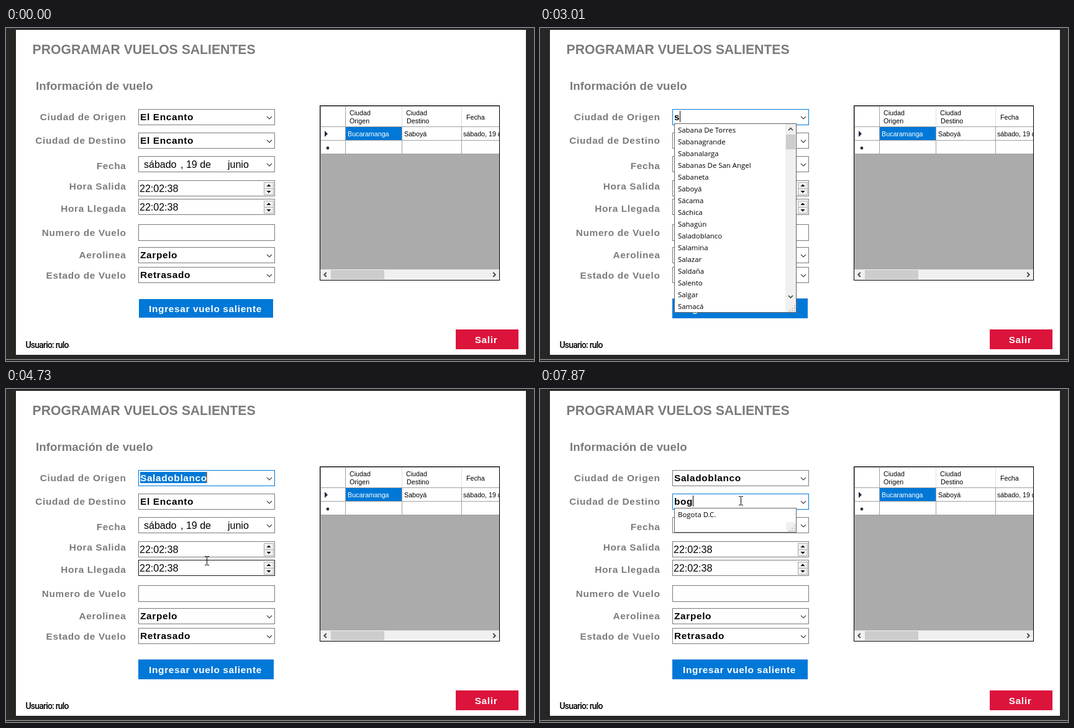
An HTML page with a canvas for the animation above (8 s loop, 850x538 px).

```html
<!DOCTYPE html>
<html lang="es">
<head>
<meta charset="utf-8">
<title>Programar vuelos salientes</title>
<style>
html, body { margin: 0; width: 100%; height: 100%; overflow: hidden; background: #262626; }
canvas { display: block; }
</style>
</head>
<body>
<canvas id="stage" width="850" height="538"></canvas>
<script>
const ctx = document.getElementById('stage').getContext('2d');
const LOOP = 8000, STEP = 200 / 3;
const BLUE = '#0078d7', GRAY = '#7a7a7a', LABEL = '#7b7b7b';
const SANS = '"Liberation Sans", Arial, sans-serif';
const BOLD = `bold 15.4px ${SANS}`, PLAIN = `16px ${SANS}`, SMALL = `10.7px ${SANS}`;
const BOLD_SPACING = 0.65;
const MENU = '11.4px "Open Sans", sans-serif';

const LABELS = [
  ['Ciudad de Origen', 149], ['Ciudad de Destino', 187], ['Fecha', 228],
  ['Hora Salida', 261], ['Hora Llegada', 297], ['Numero de Vuelo', 336],
  ['Aerolinea', 372], ['Estado de Vuelo', 405]
];
const FIELDS = [
  { y: 131, kind: 'combo' }, { y: 169, kind: 'combo' }, { y: 207, kind: 'date' },
  { y: 246, kind: 'time' }, { y: 276, kind: 'time' }, { y: 317, kind: 'text', h: 27 },
  { y: 354, kind: 'combo', text: 'Zarpelo' }, { y: 386, kind: 'combo', text: 'Retrasado' }
];
const ALL = ('El Encanto,La Chorrera,La Pedrera,La Victoria,Leticia,Mirití - Paraná,Puerto Alegría,' +
  'Puerto Arica,Puerto Nariño,Puerto Santander,Tarapacá,Abejorral,Abriaquí,Alejandría,Amagá,' +
  'Amalfi,Andes,Angelópolis,Angostura,Anorí').split(',');
const S_LIST = ('Sabana De Torres,Sabanagrande,Sabanalarga,Sabanas De San Angel,Sabaneta,Saboyá,' +
  'Sácama,Sáchica,Sahagún,Saladoblanco,Salamina,Salazar,Saldaña,Salento,Salgar,Samacá,' +
  'Samaná,Samaniego').split(',');
const SA_LIST = S_LIST.filter(name => name[1] === 'a');
const B_LIST = ('Bagadó,Bahía Solano,Bajo Baudó,Balboa,Baranoa,Baraya,Barbacoas,Barbosa,Barichara,' +
  'Barranca De Upía,Barrancabermeja,Barrancas,Barranco De Loba,Barranco Minas,Barranquilla,' +
  'Becerril').split(',');
const BO_LIST = 'Boavita,Bochalema,Bogota D.C.,Bojacá,Bojayá,Bolívar,Bosconia,Boyacá'.split(',');

// Pointer path: time, x, y
const PATH = [
  [270, 637, 449], [1070, 421, 147], [1670, 421, 147], [1800, 394, 149], [3490, 394, 149],
  [4000, 323, 313], [4130, 323, 302], [4460, 323, 302], [5060, 323, 215], [5265, 323, 180]
];
const CLICKS = [[1210, 1410], [1800, 2010], [4320, 4520], [5550, 5680]];

const between = (t, a, b) => t >= a && t < b;

function rect(x, y, w, h, color) {
  ctx.fillStyle = color;
  ctx.fillRect(x, y, w, h);
}
function box(x, y, w, h, border, fill) {
  rect(x, y, w, h, border);
  rect(x + 1, y + 1, w - 2, h - 2, fill);
}
function text(str, x, y, font, color, spacing = 0, align = 'left') {
  ctx.font = font;
  ctx.letterSpacing = spacing + 'px';
  ctx.textAlign = align;
  ctx.fillStyle = color;
  ctx.fillText(str, x, y);
}
const bold = (str, x, y, color = '#000', align) => text(str, x, y, BOLD, color, BOLD_SPACING, align);

function shape(points, color, x = 0, y = 0) {
  ctx.beginPath();
  points.forEach(([px, py]) => ctx.lineTo(x + px, y + py));
  ctx.closePath();
  ctx.fillStyle = color;
  ctx.fill();
}
function chevron(x, y, angle = 0, width = 1.2, size = 4) {
  ctx.save();
  ctx.translate(x, y);
  ctx.rotate(angle);
  ctx.beginPath();
  ctx.moveTo(-size, -size / 2);
  ctx.lineTo(0, size / 2);
  ctx.lineTo(size, -size / 2);
  ctx.strokeStyle = '#444';
  ctx.lineWidth = width;
  ctx.stroke();
  ctx.restore();
}

function pointerAt(time) {
  if (time < 270 || between(time, 3010, 3490)) return null;
  const t = 270 + Math.floor((time - 269) / STEP) * STEP;
  const next = PATH.findIndex(p => p[0] > t);
  if (next < 0) return { x: 323, y: 180 };
  const [ta, xa, ya] = PATH[Math.max(0, next - 1)], [tb, xb, yb] = PATH[next];
  const u = Math.max(0, (t - ta) / (tb - ta)), k = u * u * (3 - 2 * u);
  return { x: Math.round(xa + (xb - xa) * k), y: Math.round(ya + (yb - ya) * k) };
}

function originAt(t) {
  const blinkOff = between(t, 2410, 2870) || between(t, 3620, 4390) || t >= 4920;
  const value = t < 3010 ? 'El Encanto' : t < 3090 ? 's' : t < 4390 ? 'sa' : 'Saladoblanco';
  const focus = between(t, 1210, 5550);
  return {
    text: value, focus, caret: focus && !blinkOff,
    selected: focus && !between(t, 3010, 4390),
    list: between(t, 3010, 3090) ? S_LIST : between(t, 3090, 4390) ? SA_LIST : null
  };
}
function destinationAt(t) {
  const blinkOff = between(t, 6210, 6740) || between(t, 7270, 7530);
  const value = t < 7530 ? 'El Encanto' : t < 7750 ? 'b' : t < 7870 ? 'bo' : 'bog';
  const focus = t >= 5550;
  return {
    text: value, focus, caret: focus && !blinkOff, selected: focus && t < 7530,
    list: { b: B_LIST, bo: BO_LIST, bog: ['Bogota D.C.'] }[value] || null
  };
}

function entry(state, y) {
  ctx.font = BOLD;
  ctx.letterSpacing = BOLD_SPACING + 'px';
  const end = 216 + Math.floor(ctx.measureText(state.text).width);
  if (state.selected) rect(216, y + 3, end - 216, 18, BLUE);
  bold(state.text, 216, y + 18, state.selected ? '#fff' : '#000');
  if (state.caret) rect(end, y + 3, 1, 18, state.selected ? '#ff8728' : '#000');
}

function spinner(y) {
  for (const [top, dir] of [[y + 3, -1], [y + 13, 1]]) {
    box(415, top, 16, 11, '#acacac', '#f0f0f0');
    const mid = top + 5.5;
    shape([[419.5, mid - 1.5 * dir], [426.5, mid - 1.5 * dir], [423, mid + 2 * dir]], '#000');
  }
}

function drawField(field, state, pointer, covered) {
  const { y, kind, h = 26 } = field;
  const hover = pointer && !covered && between(pointer.x, 213, 433) && between(pointer.y, y, y + h);
  const border = state && state.focus ? BLUE : hover ? '#171717' : GRAY;
  box(213, y, 220, h, border, '#fff');
  if (kind === 'combo' && hover && pointer.x >= 416) box(416, y, 17, h, '#005499', '#cce4f7');
  if (kind === 'combo' || kind === 'date') chevron(424, y + 14);
  if (state) entry(state, y);
  else if (kind === 'combo') bold(field.text, 216, y + 18);
  else if (kind === 'date') {
    text('sábado', 222, y + 19, PLAIN, '#000');
    text(', 19 de', 281, y + 19, PLAIN, '#000');
    text('junio', 357, y + 19, PLAIN, '#000');
  } else if (kind === 'time') {
    text('22:02:38', 215, y + 19, PLAIN, '#000');
    spinner(y);
  }
  return hover && kind !== 'date' && pointer.x < 415;
}

function drawGrid() {
  box(505, 125, 290, 283, '#000', '#ababab');
  rect(506, 126, 288, 78, '#fff');
  for (const y of [126, 159, 181, 203]) rect(506, y, 288, 1, '#a0a0a0');
  for (const x of [637, 733]) {
    rect(x, 127, 1, 32, '#e0e0e0');
    rect(x, 159, 1, 45, '#a0a0a0');
  }
  for (const x of [506, 546]) rect(x, 126, 1, 78, '#a0a0a0');
  rect(547, 160, 90, 21, BLUE);
  text('Ciudad', 553, 141, SMALL, '#000');
  text('Origen', 553, 154, SMALL, '#000');
  text('Ciudad', 644, 141, SMALL, '#000');
  text('Destino', 645, 154, SMALL, '#000');
  text('Fecha', 741, 148, SMALL, '#000');
  text('Bucaramanga', 550, 175, SMALL, '#fff');
  text('Saboyá', 641, 175, SMALL, '#000');
  ctx.save();
  ctx.beginPath();
  ctx.rect(734, 160, 60, 21);
  ctx.clip();
  text('sábado, 19 de junio', 736, 175, SMALL, '#000');
  ctx.restore();
  shape([[513, 166], [518, 171], [513, 176]], '#2b2540');
  ctx.beginPath();
  ctx.arc(518, 194, 2.4, 0, 7);
  ctx.fillStyle = '#333';
  ctx.fill();
  rect(506, 390, 288, 17, '#f0f0f0');
  rect(523, 391, 86, 15, '#cdcdcd');
  chevron(514, 398.5, Math.PI / 2, 1.8, 3.5);
  chevron(786, 398.5, -Math.PI / 2, 1.8, 3.5);
}

function drawForm(t) {
  rect(0, 0, 850, 538, '#262626');
  rect(16, 3, 821, 525, '#fff');
  rect(0, 535, 850, 1, '#b4b0b0');
  text('PROGRAMAR VUELOS SALIENTES', 42.5, 42, `bold 21.2px ${SANS}`, LABEL);
  text('Información de vuelo', 48, 100, `bold 18.67px ${SANS}`, LABEL, 0.05);
  for (const [label, y] of LABELS) bold(label, 193.5, y, LABEL, 'right');
  const grow = t >= 1270 ? 1 : 0;
  rect(214 - grow, 438 - grow, 216 + 2 * grow, 30 + 2 * grow, BLUE);
  bold('Ingresar vuelo saliente', 321, 459, '#fff', 'center');
  rect(724, 487, 101, 32, '#dc143c');
  bold('Salir', 773, 509, '#fff', 'center');
  text('Usuario: rulo', 31.5, 517, '500 14px Roboto, sans-serif', '#000', -0.8);
  drawGrid();
}

function drawDropdown() {
  rect(433, 161, 5, 377, 'rgba(0,0,0,.12)');
  box(213, 157, 220, 400, '#000', '#fff');
  ALL.forEach((city, i) => {
    const y = 158 + i * 20;
    if (!i) rect(214, y, 202, 20, BLUE);
    bold(city, 216, y + 15, i ? '#000' : '#fff');
  });
  rect(416, 158, 16, 380, '#f0f0f0');
  rect(416, 175, 16, 20, '#cdcdcd');
  chevron(424, 166, Math.PI, 1.6, 3.5);
}

function drawSuggestions(names, top, pointer) {
  const rows = Math.min(names.length, 16), scrolls = names.length >= 16;
  const height = scrolls ? 306 : rows * 19 + 21, bottom = top + height;
  box(216, top, 197, height, '#646464', '#fff');
  names.slice(0, rows).forEach((name, i) => {
    const y = top + 1 + i * 19;
    const hot = pointer && pointer.x < 395 && between(pointer.y, y, y + 19);
    if (hot) rect(217, y, 178, 19, BLUE);
    text(name, 222, y + 14, MENU, hot ? '#fff' : '#000');
  });
  if (scrolls) {
    rect(395, top + 1, 17, height - 2, '#f0f0f0');
    rect(396, top + 18, 15, names === SA_LIST ? 34 : 24, '#cdcdcd');
    chevron(403.5, top + 9.5, Math.PI, 1.7, 3.5);
    chevron(403.5, top + 280, 0, 1.7, 3.5);
  }
  rect(396, bottom - 17, 16, 16, '#f0f0f0');
  for (let i = 0; i < 3; i++)
    for (let j = 0; j <= i; j++) rect(409 - j * 4, bottom - 12 + i * 4, 2, 2, '#bfbfbf');
}

function drawPointer({ x, y }, beam, clicked) {
  if (clicked) {
    ctx.beginPath();
    ctx.arc(x, y, 12, 0, 7);
    ctx.fillStyle = 'rgba(240,235,50,.65)';
    ctx.fill();
  }
  if (beam) {
    rect(x, y - 6, 1, 13, '#000');
    for (const dy of [-7, 7]) {
      rect(x - 3, y + dy, 3, 1, '#000');
      rect(x + 1, y + dy, 3, 1, '#000');
    }
    return;
  }
  const arrow = [[0.5, 0.5], [0.5, 16.5], [4, 13], [6.5, 18.5], [9, 17.5], [6.5, 12], [11.5, 12]];
  shape(arrow, '#fff', x, y);
  ctx.strokeStyle = '#000';
  ctx.lineWidth = 1;
  ctx.stroke();
}

function draw(t) {
  const pointer = pointerAt(t), states = [originAt(t), destinationAt(t)];
  const covered = states[0].list && pointer && pointer.y >= 155;
  let beam = false;
  drawForm(t);
  FIELDS.forEach((field, i) => {
    if (drawField(field, states[i], pointer, covered)) beam = true;
  });
  if (between(t, 1270, 1800)) drawDropdown();
  states.forEach((state, i) => {
    if (state.list) drawSuggestions(state.list, FIELDS[i].y + 23, pointer);
  });
  if (pointer) drawPointer(pointer, beam, CLICKS.some(([a, b]) => between(t, a, b)));
}

let start;
function frame(now) {
  start ??= now;
  draw((now - start) % LOOP);
  requestAnimationFrame(frame);
}
draw(0);
requestAnimationFrame(frame);
</script>
</body>
</html>
```
